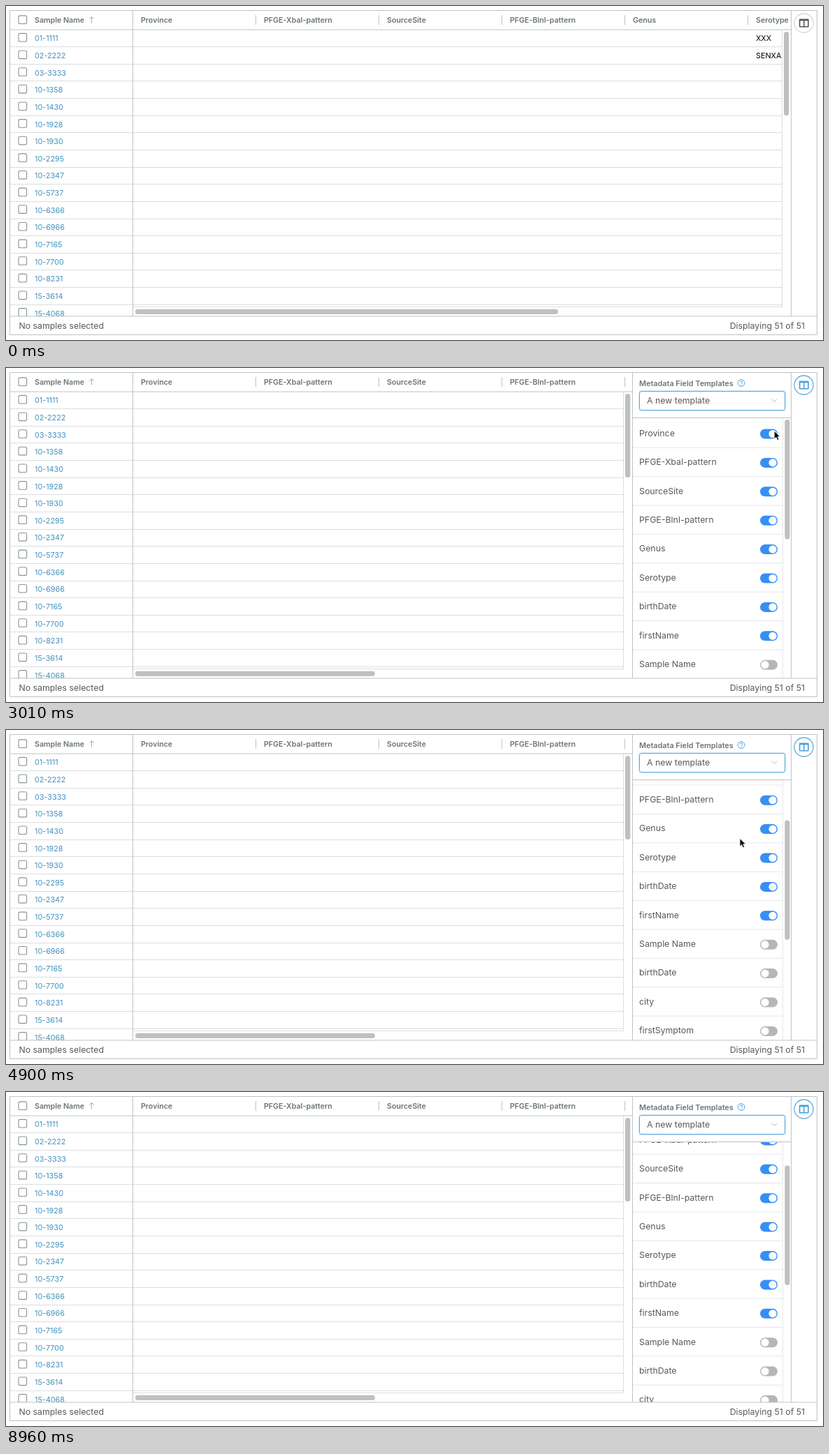
Animation of 1169x479 px, one loop 9.17 s. Source, as an HTML page:

```html
<!DOCTYPE html>
<html>
<head>
<meta charset="utf-8">
<style>
html, body { margin: 0; width: 100%; height: 100%; overflow: hidden; background: #fff }
svg { display: block; width: 1169px; height: 479px; font: 400 12.32px Inter, "Open Sans", sans-serif; fill: #595959 }
.head { font-size: 10.65px; font-weight: 600; fill: #6b7478 }
.cell { font-size: 10.8px; fill: #000 }
.link { font-size: 10.8px; fill: #4491bd }
.border { stroke: #bdc3c7; fill: none }
.line { stroke: #dadddf; fill: none }
.thumb { fill: #c0c0c0 }
.box { fill: #fff; stroke: #8a9497; stroke-width: 1.1 }
</style>
</head>
<body>
<svg viewBox="0 0 1169 479">
  <defs>
    <clipPath id="gridClip"><rect id="gridClipRect" x="6" y="6" height="439"/></clipPath>
    <clipPath id="cellClip"><rect x="182" y="34" width="928" height="398"/></clipPath>
    <clipPath id="listClip"><rect x="897" y="72" width="226" height="373"/></clipPath>
  </defs>
  <g id="grid" clip-path="url(#gridClip)"></g>
  <g id="bars"></g>
  <g id="panel">
    <rect x="897" y="7" width="226" height="438" fill="#fff"/>
    <path class="border" d="M896.5 6V445M897 71.5H1123"/>
    <text class="head" x="906" y="25.5" style="font-size:10.85px">Metadata Field Templates</text>
    <circle cx="1052" cy="21.5" r="4.9" fill="none" stroke="#4a9fd6"/>
    <path d="M1050.3 20.5a1.7 1.6 0 1 1 2.3 1.4q-.6.3-.6 1M1052 23.8v1" fill="none" stroke="#4a9fd6"/>
    <rect x="905" y="32" width="211" height="30" rx="4" fill="#d4eafa"/>
    <rect x="906.5" y="33.5" width="208" height="27" rx="3" fill="#fff" stroke="#58a9dc"/>
    <text x="917" y="51">A new template</text>
    <path d="M1095.5 44.5l4 4 4-4" fill="none" stroke="#bdbdbd"/>
    <g clip-path="url(#listClip)">
      <g id="list"></g>
      <path d="M1111.5 72V445" class="line" stroke-opacity=".7"/>
      <rect id="listThumb" class="thumb" x="1114.3" width="7.2" height="171.5" rx="3.6"/>
    </g>
  </g>
  <path class="border" d="M5.5 6.5H1160.5V471.5H5.5ZM5 445H1161M1123.5 6V445"/>
  <text x="18.5" y="463">No samples selected</text>
  <text x="1143" y="463" text-anchor="end">Displaying 51 of 51</text>
  <circle id="ring" cx="1141.5" cy="24.5" r="13.6" fill="#fff" stroke-width="1.1"/>
  <path id="icon" fill-rule="evenodd" d="M1136 18.5h11.5q1.2 0 1.2 1.2v9.6q0 1.2-1.2 1.2H1136q-1.2 0-1.2-1.2v-9.6q0-1.2 1.2-1.2ZM1136.4 21.3v7.6h4.6v-7.6ZM1142.5 21.3v7.6h4.6v-7.6Z"/>
  <g id="tip">
    <path d="M1012 11h102q3 0 3 3v7l5 4-5 4v8q0 3-3 3h-102q-3 0-3-3V14q0-3 3-3Z" fill="#1f1f1f" fill-opacity=".9"/>
    <text x="1063" y="30" text-anchor="middle" fill="#fff">Column Visibility</text>
  </g>
  <path id="arrow" d="M0 0V11.5L2.7 9 4.6 13.2 6.6 12.3 4.8 8.2H8.4Z" fill="#000" stroke="#fff" stroke-width=".8"/>
  <path id="hand" d="M-1 1Q0-1 1.3 .8L2.4 5 3.6 4.6 5.2 5.2 6.7 5.2 8.6 6.4Q9.4 8.5 8.2 11L7.8 13.6H2.2L-1.8 8.6Q-2.4 6.8-.2 7.4L.8 8.2ZM3.3 9v2.6M5.2 9v2.6M7 9v2.6" fill="#fff" stroke="#111" stroke-width=".9" stroke-linejoin="round"/>
</svg>
<script>
const LOOP = 9170;
const $ = id => document.getElementById(id);
const text = (cls, x, y, s) => `<text class="${cls}" x="${x}" y="${y}">${s}</text>`;
const box = y => `<rect class="box" x="18" y="${y - 5.7}" width="11.6" height="11.6" rx="2"/>`;
const show = (id, on) => $(id).style.display = on ? '' : 'none';

const samples = '01-1111 02-2222 03-3333 10-1358 10-1430 10-1928 10-1930 10-2295 10-2347 10-5737 10-6366 10-6966 10-7165 10-7700 10-8231 15-3614 15-4068'.split(' ');
const columns = ['Province', 'PFGE-XbaI-pattern', 'SourceSite', 'PFGE-BlnI-pattern', 'Genus', 'Serotype'];
const fields = [...columns, 'birthDate', 'firstName', 'Sample Name', 'birthDate', 'city', 'firstSymptom'];
const ROW = 24.64, ITEM = 41.4;

$('grid').innerHTML = box(19.6) + text('head', 41, 23.9, 'Sample Name') +
  '<path d="M122.5 24.5V15.5M119.5 18.5l3-3 3 3" fill="none" stroke="#a3abae"/>' +
  columns.map((name, i) => text('head', 193 + 176 * i, 23.9, name) +
    (i ? `<path class="border" d="M${181.5 + 176 * i} 13V27"/>` : '')).join('') +
  samples.map((name, i) => {
    const y = 46.3 + ROW * i;
    return box(y - 1.2) + text('link', 41, y + 4, name) +
      `<path class="line" d="M6 ${Math.floor(34 + ROW * (i + 1)) + .5}H1110"/>`;
  }).join('') +
  `<g clip-path="url(#cellClip)">${text('cell', 1073, 50.3, 'XXX') + text('cell', 1073, 75, 'SENXAP')}</g>` +
  '<path class="border" d="M6 34H1123M181.5 6V445"/>';

$('list').innerHTML = fields.map((name, i) => {
  const y = 93 + ITEM * i + 1, on = i < 8;
  return text('', 906, y + 3.8, name) +
    `<rect x="1079" y="${y - 6.5}" width="25" height="14" rx="7" fill="${on ? '#368ff4' : '#b6b6b6'}"/>` +
    `<circle cx="${on ? 1097 : 1086}" cy="${y + .5}" r="5.6" fill="#fff"/>` +
    `<path d="M897 ${y + 20.2}H1111" stroke="#e6e6e6"/>`;
}).join('');

// Scrollbars around the grid, whose right edge depends on the panel
function layoutBars(open) {
  const right = open ? 896 : 1123;
  $('gridClipRect').setAttribute('width', right - 6);
  $('bars').innerHTML =
    `<rect x="${right - 13}" y="35" width="13" height="410" fill="#fff"/>` +
    `<rect x="182" y="432" width="${right - 182}" height="12.5" fill="#fff"/>` +
    `<path class="line" d="M182 431.5H${right - 12.5}V34.5"/>` +
    `<rect class="thumb" x="${right - 10}" y="37" width="7.2" height="120" rx="3.6"/>` +
    `<rect class="thumb" x="185" y="434.7" width="${open ? 343 : 605}" height="7.2" rx="3.6"/>`;
}

// Eased interpolation through [time, ...values]
function track(keys, t) {
  const i = keys.findIndex(k => k[0] > t);
  if (i < 0) return keys.at(-1).slice(1);
  if (!i) return keys[0].slice(1);
  const a = keys[i - 1], b = keys[i];
  const p = (t - a[0]) / (b[0] - a[0]), e = p * p * (3 - 2 * p);
  return a.slice(1).map((v, n) => v + (b[n + 1] - v) * e);
}

const pointer = [[350, 960, 490], [1260, 1092, 110], [1610, 1144.5, 27], [2170, 1144.5, 27], [2240, 1146, 28],
  [2730, 1146, 28], [3290, 1053, 152], [3990, 1052, 152], [4900, 1050, 155.5], [5250, 1050, 155.5],
  [5880, 1149, 29.5], [7630, 1149, 29.5], [8190, 1185, 70]];
const scroll = [[3430, 0], [3990, 38], [4340, 78], [4480, 78], [4830, 118], [4900, 118], [5250, 66.5]];
const tip = [[1540, 0], [1750, 1], [2800, 1], [2940, 0], [5880, 0], [6090, 1], [7700, 1], [7840, 0]];
const between = (t, ...spans) => spans.some(([a, b]) => t >= a && t < b);

let wasOpen;
function draw(now) {
  const t = now % LOOP;
  const open = between(t, [2590, 6440], [7490, LOOP]);
  if (open !== wasOpen) layoutBars(wasOpen = open);
  show('panel', open);

  const [s] = track(scroll, t);
  $('list').setAttribute('transform', `translate(0 ${-s})`);
  $('listThumb').setAttribute('y', 74 + s * .47);

  const [x, y] = track(pointer, t);
  const hover = Math.hypot(x - 1141.5, y - 24.5) < 14;
  for (const id of ['arrow', 'hand']) $(id).setAttribute('transform', `translate(${x} ${y})`);
  show('hand', hover);
  show('arrow', !hover && t > 350 && t < 8190);

  const pressed = between(t, [2520, 2590], [6370, 6440], [7350, 7490]);
  const active = hover || t > 2520;
  const tint = pressed ? '#2770a8' : '#4a9fd6';
  $('ring').setAttribute('stroke', active ? tint : '#cfd2d4');
  $('icon').setAttribute('fill', active ? tint : '#555');

  $('tip').setAttribute('opacity', track(tip, t)[0]);
  $('tip').setAttribute('transform', `translate(${open ? 1 : 0} 0)`);
  requestAnimationFrame(draw);
}
requestAnimationFrame(draw);
</script>
</body>
</html>
```
